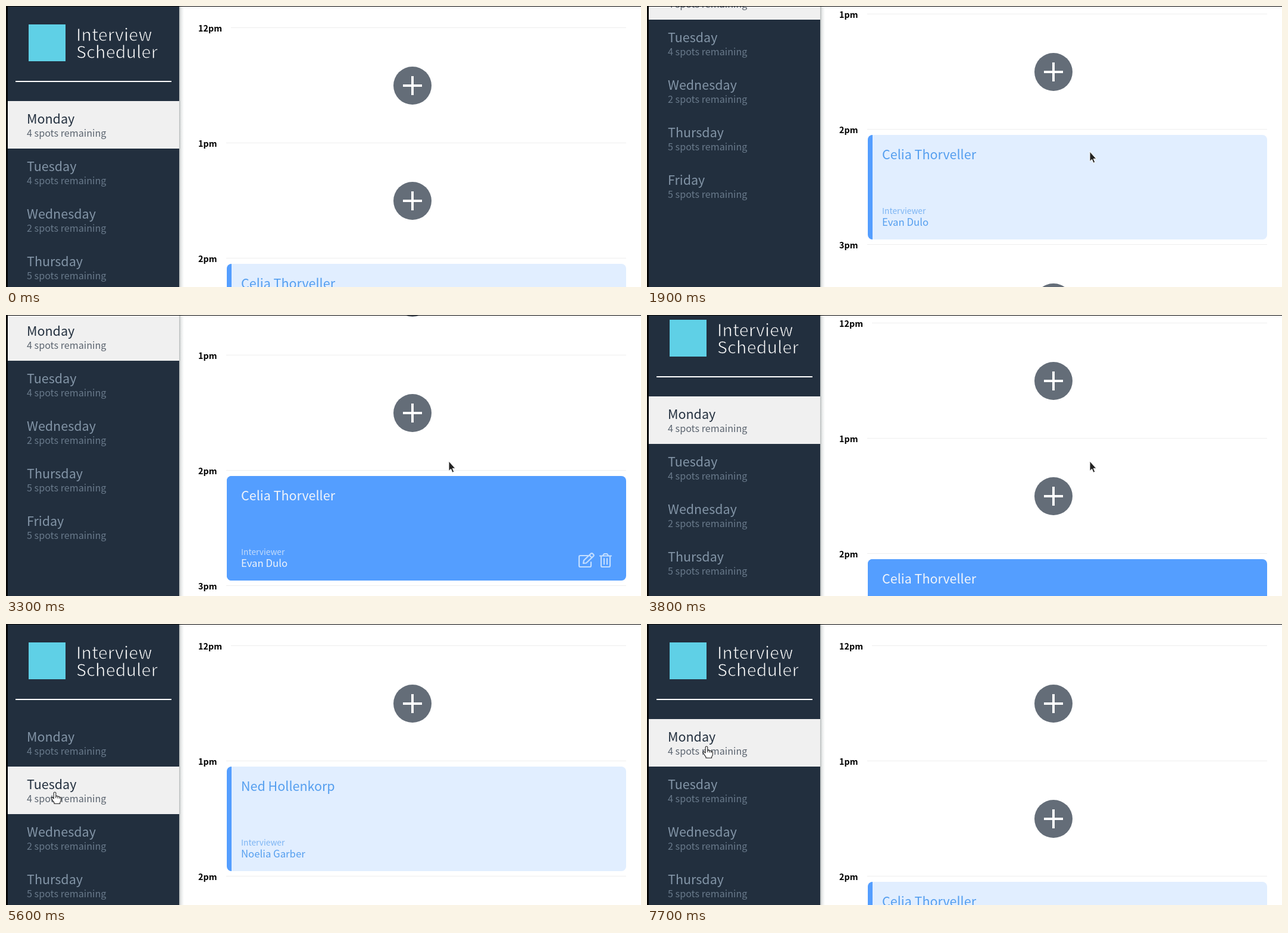
Write an HTML page that moves like this. It is 1067 px wide and 473 px high and loops after 8000 ms.

```html
<!DOCTYPE html>
<html lang="en">
<head>
<meta charset="utf-8">
<title>Interview Scheduler</title>
<style>
  html, body { margin: 0; width: 100%; height: 100%; overflow: hidden; background: #fff; }
  svg { display: block; }
  text { font-family: "Noto Sans CJK JP", "Noto Sans CJK SC", "Noto Sans CJK KR", "Noto Sans CJK TC", "Noto Sans CJK", "Noto Sans", sans-serif; }
  .h2 { font-size: 21.5px; }
  .h3 { font-size: 16.76px; }
  .h4 { font-size: 14.33px; }
  .light { font-weight: 300; fill-opacity: .72; }
  .h3.light { font-size: 16.15px; }
  .h4.light { font-size: 13.75px; }
  /* the sidebar-coloured outline thins the strokes */
  .brand { font-size: 28.65px; font-weight: 300; letter-spacing: .2px; fill: #fff; stroke: #222f3e; stroke-width: .8; }
  .time { font-weight: 600; fill: #000; }
  .day text { fill: #8395a7; }
  .day rect { fill: transparent; }
  .day.hover rect { fill: #3a4654; }
  .day.selected rect { fill: #f0f0f0; }
  .day.selected text { fill: #222f3e; }
  .add circle { fill: #646d78; }
  .add.hover circle { fill: #222f3e; }
  .add path { stroke: #fff; stroke-width: 4; }
  .card .bg { fill: #e1eeff; }
  .card text { fill: #549eef; }
  .card .icons { display: none; fill: none; stroke: #c3deff; stroke-width: 2.2; stroke-linejoin: round; stroke-linecap: round; }
  .card.hover .bg { fill: #549eff; }
  .card.hover text { fill: #f0f4fa; }
  .card.hover .icons { display: inline; }
</style>
</head>
<body>
<svg width="1067" height="473" viewBox="0 0 1067 473">
  <defs>
    <linearGradient id="shade">
      <stop offset="0" stop-color="#1c2b2b" stop-opacity=".32"/>
      <stop offset=".4" stop-color="#1c2b2b" stop-opacity=".1"/>
      <stop offset="1" stop-color="#1c2b2b" stop-opacity="0"/>
    </linearGradient>
    <clipPath id="round"><rect x="371" width="671" height="176" rx="8"/></clipPath>
  </defs>
  <rect width="1067" height="473" fill="#fff"/>
  <rect x="291" width="8" height="473" fill="url(#shade)"/>
  <rect x="3" width="288" height="473" fill="#222f3e"/>
  <g id="page">
    <rect x="38" y="31" width="62" height="62" fill="#5fd0e6"/>
    <text class="brand" x="118" y="59">Interview</text>
    <text class="brand" x="118" y="88">Scheduler</text>
    <rect x="16" y="126" width="262" height="2" fill="#fff"/>
    <g id="days"></g>
    <g id="hours"></g>
    <g id="monday"></g>
    <g id="tuesday"></g>
  </g>
  <path d="M0 0H1067V1H3V473H0Z" fill="#050505"/>
  <g id="cursor">
    <path id="arrow" d="M0 0V16.5L3.6 13.2L6.1 19.2L8.8 18L6.3 12.2H11Z" fill="#222" stroke="#fff"/>
    <path id="hand" d="M-1.8 1.5Q-1.8 0 0 0T1.8 1.5V7Q4.6 5.6 5 7.6Q7.4 6.6 8 8.6Q10.4 8 10.4 10.4V13.5Q10.4 15.5 8.6 17.5V19.5H-1V17.5Q-3 15.6 -4.4 12.8L-6 10.4Q-6 8.4 -4 9L-1.8 11ZM1.8 7V10M5 8V10.5M8 9V11" fill="#fff" stroke="#222" stroke-width="1.1" stroke-linejoin="round"/>
  </g>
</svg>
<script>
const LOOP = 8000, STEP = 100, MAX_SCROLL = 318;
const $ = id => document.getElementById(id);

// pointer strokes: start, end and control point of a curve
const moves = [
  { start: 400, end: 1000, from: [690, 56], via: [684, 164], to: [733, 202] },
  { start: 1200, end: 2000, from: [733, 202], via: [738, 224], to: [744, 246], power: 1.7 },
  { start: 4400, end: 5100, from: [744, 246], via: [331, 183], to: [82, 283] },
  { start: 6300, end: 6800, from: [82, 283], via: [82, 235], to: [100, 206] }
];

// 0 to 1 between two times, slowing towards the end
function glide(t, start, end, power = 1) {
  const p = Math.min(1, Math.max(0, (t - start) / (end - start)));
  return 1 - (1 - p) ** power;
}

const scrollAt = t => MAX_SCROLL * (glide(t, 1100, 2500, 1.35) - glide(t, 2800, 3900, 1.1));

function pointerAt(t) {
  const m = moves.findLast(m => t >= m.start) ?? moves[0];
  const p = glide(t, m.start, m.end, m.power), q = 1 - p;
  return m.from.map((v, i) => q * q * v + 2 * p * q * m.via[i] + p * p * m.to[i]);
}

const slotTop = i => 36 + 194 * i;

const dayRow = ([name, spots], i) => `
  <g class="day" transform="translate(0 ${160 + 80 * i})">
    <rect x="3" width="288" height="80"/>
    <text class="h2" x="35" y="38">${name}</text>
    <text class="h3 light" x="35" y="60">${spots} spots remaining</text>
  </g>`;

const hourLine = (label, i) => `
  <text class="h4 time" x="323" y="${slotTop(i) + 7}">${label}</text>
  <rect x="${i ? 370 : 378}" y="${slotTop(i)}" width="${i ? 672 : 664}" height="1" fill="#eee"/>`;

const addButton = i => `
  <g class="add" transform="translate(683 ${slotTop(i) + 98})">
    <circle r="32"/><path d="M-16 0H16M0 -16V16"/>
  </g>`;

const card = (i, student, interviewer) => `
  <g class="card" transform="translate(0 ${slotTop(i) + 10})">
    <g clip-path="url(#round)">
      <rect class="bg" x="371" width="671" height="176"/>
      <rect x="371" width="8" height="176" fill="#549eff"/>
    </g>
    <text class="h2" x="395" y="41">${student}</text>
    <text class="h4 light" x="395" y="133">Interviewer</text>
    <text class="h3" x="395" y="153">${interviewer}</text>
    <g class="icons">
      <path d="M978 134H965Q963 134 963 136V151Q963 153 965 153H981Q983 153 983 151V145M970 147L971 142L983 130.5Q984.5 129.5 986 131L987 132Q988.5 133.5 987 135L975 146.5ZM980.5 133.5L984.5 137.5"/>
      <path d="M998 134.5H1017M1000 135V151Q1000 153 1002 153H1013Q1015 153 1015 151V135M1003 134L1005 131H1010L1012 134M1005 139V148.5M1010 139V148.5"/>
    </g>
  </g>`;

$('days').innerHTML = [['Monday', 4], ['Tuesday', 4], ['Wednesday', 2], ['Thursday', 5], ['Friday', 5]].map(dayRow).join('');
$('hours').innerHTML = ['12pm', '1pm', '2pm', '3pm'].map(hourLine).join('');
$('monday').innerHTML = addButton(0) + addButton(1) + card(2, 'Celia Thorveller', 'Evan Dulo') + addButton(3);
$('tuesday').innerHTML = addButton(0) + card(1, 'Ned Hollenkorp', 'Noelia Garber') + addButton(2) + addButton(3);

const days = [...document.querySelectorAll('.day')];
const firstAdd = document.querySelector('#monday .add');
const booking = document.querySelector('#monday .card');
const show = (el, on) => el.style.display = on ? '' : 'none';

function draw(ms) {
  const t = Math.floor(ms / STEP) * STEP;
  const scroll = Math.round(scrollAt(t));
  const [x, y] = pointerAt(t).map(Math.round);
  const visible = t >= 500;
  const selected = t >= 5600 && t < 7700 ? 1 : 0;
  const row = visible && x < 291 ? Math.floor((y - 160) / 80) : -1;
  const onAdd = visible && scroll === 0 && Math.hypot(x - 683, y - 134) < 32;
  const pointing = onAdd || row >= 0;

  $('page').setAttribute('transform', `translate(0 ${-scroll})`);
  days.forEach((d, i) => {
    d.classList.toggle('selected', i === selected);
    d.classList.toggle('hover', i === row);
  });
  show($('monday'), selected === 0);
  show($('tuesday'), selected === 1);
  firstAdd.classList.toggle('hover', onAdd);
  // hover lags behind the scrolling
  booking.classList.toggle('hover', t >= 2200 && t < 4300);

  show($('cursor'), visible);
  show($('arrow'), !pointing);
  show($('hand'), pointing);
  $('cursor').setAttribute('transform', `translate(${x} ${y})`);
}

let start;
function tick(now) {
  start ??= now;
  draw((now - start) % LOOP);
  requestAnimationFrame(tick);
}
draw(0);
requestAnimationFrame(tick);
</script>
</body>
</html>
```
